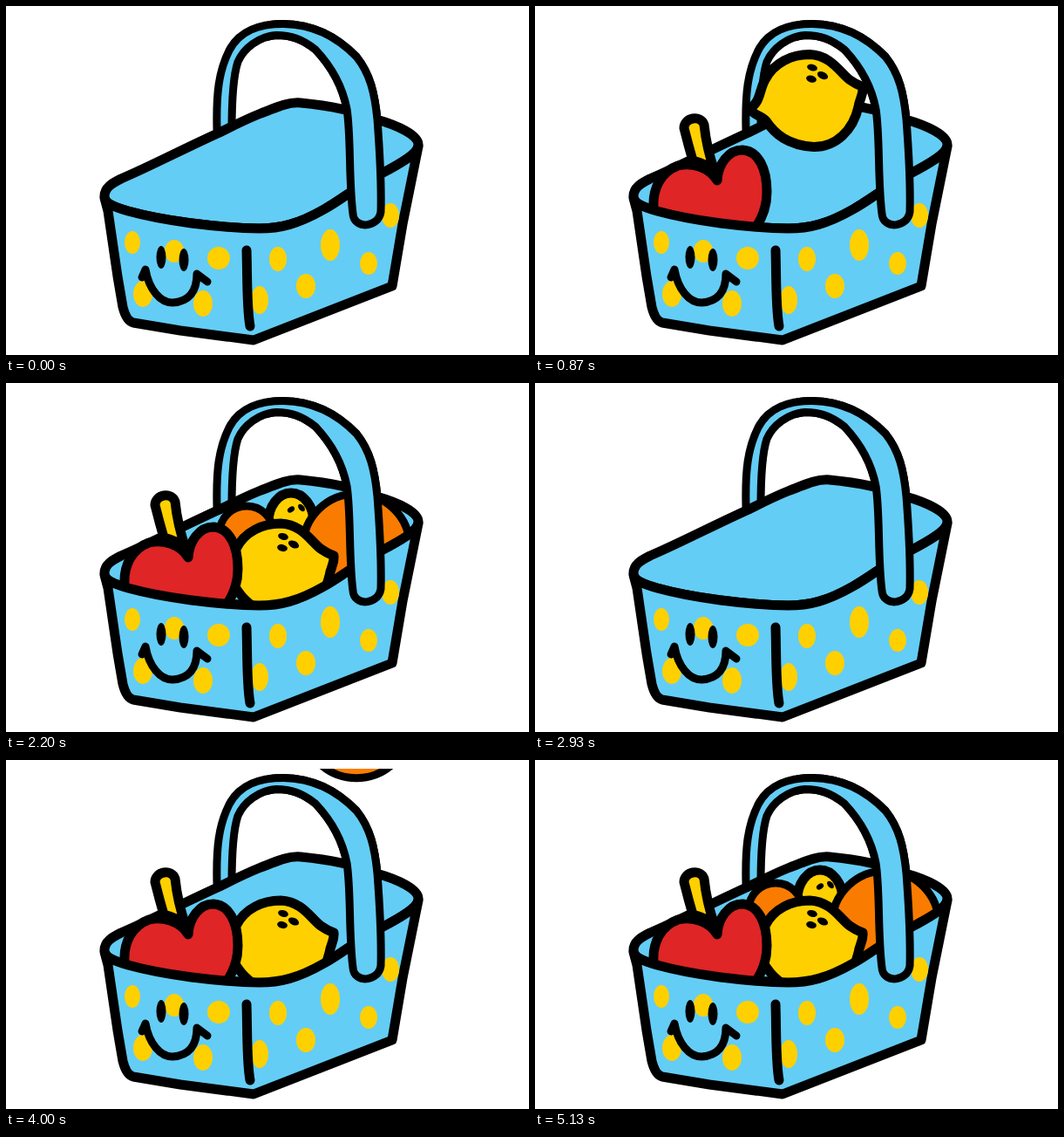
Write an HTML page that moves like this. It is 600 by 400 pixels and loops after 5.83 s.

```html
<!DOCTYPE html>
<html lang="en">
<head>
<meta charset="utf-8">
<title>Fruit basket</title>
<style>
  html, body { margin: 0; width: 100%; height: 100%; overflow: hidden; background: #fff; }
  svg { display: block; width: 600px; height: 400px; }
  .line { stroke: #000; stroke-width: 11; stroke-linejoin: round; stroke-linecap: round; }
  .thin { stroke-width: 9; }
  .blue { fill: #64cdf5; }
  .yellow { fill: #ffd000; }
  .orange { fill: #f97c00; }
  .red { fill: #df2525; }
  .none { fill: none; }
</style>
</head>
<body>
<svg viewBox="0 0 600 400">
  <defs>
    <clipPath id="stage"><rect y="10" width="600" height="390"/></clipPath>
    <clipPath id="near"><rect x="300" width="300" height="400"/></clipPath>
    <path id="handle" class="line thin blue" d="M242 142C241 100 244 75 256 51C268 28 290 20.500 318 20.500C352 21 378 34 402 58
      C418 78 423 100 426 130C429 170 431 200 430 236C427 255 399 256 398 238C393 200 396 150 391 118
      C386 92 372 68 355 50C340 38 327 33.500 310 33.500C290 35 273 48 266 64C260 82 259 110 259 142"/>
  </defs>
  <g clip-path="url(#stage)">
    <use href="#handle"/>
    <path class="line blue" d="M113 218C113 208 122 203 132 198C165 184 205 163 245 145C265 135 275 130 290 124
      C315 114 325 110 338 111C370 114 400 120 425 130C450 137 473 148 473 159
      C473 169 450 182 431 192C405 205 385 222 365 233C335 250 315 255 290 255C240 254 180 246 140 235C122 230 113 225 113 218Z"/>

    <!-- Fruit, drawn at rest, back to front -->
    <g id="smallLemon">
      <ellipse class="line yellow" cx="327" cy="160" rx="26" ry="34"/>
      <ellipse cx="327" cy="145" rx="4.500" ry="3" transform="rotate(-35 327 145)"/>
      <ellipse cx="339" cy="143" rx="5" ry="3" transform="rotate(50 339 143)"/>
    </g>
    <circle id="smallOrange" class="line thin orange" cx="276" cy="172" r="31"/>
    <ellipse id="orange" class="line thin orange" cx="402" cy="187" rx="61" ry="60"/>
    <g id="lemon">
      <path class="line yellow" d="M246 223C259 216 257 202 264 190C274 170 295 161 315 161C340 162 350 182 361 190
        Q368 195 376 198C377 208 372 212 371 221C365 248 345 267 320 267C290 265 275 252 265 237C259 231 250 230 246 223Z"/>
      <ellipse cx="318" cy="176" rx="6" ry="3.800" transform="rotate(15 318 176)"/>
      <ellipse cx="330" cy="185" rx="6.500" ry="4" transform="rotate(25 330 185)"/>
      <ellipse cx="317" cy="189" rx="6" ry="4" transform="rotate(15 317 189)"/>
    </g>
    <g id="apple">
      <path class="line red" d="M209 200C200 185 180 179 164 183C144 190 135 210 136 230C137 265 160 288 192 288
        C235 286 266 250 266 213C266 186 256 166 238 165C222 165 210 181 209 200Z"/>
      <path class="line none" d="M188 182Q203 189 209 199"/>
      <path class="line yellow" d="M171 140C171 128 190 124 194 136C196 155 200 172 206 189Q197 181 181 177Q176 160 171 140Z"/>
    </g>

    <!-- Front of the basket -->
    <path class="line blue" d="M473 161C473 169 450 182 431 192C405 205 385 222 365 233C335 250 315 255 290 255
      C240 254 180 246 140 235C122 230 113 225 113 220L117 235L128 310L134 345Q138 361 146 363L200 372L284 383L443 321L455 250Z"/>
    <g id="dots" class="yellow"></g>
    <path class="line none" d="M276 280C277 310 276 345 280 367"/>
    <ellipse cx="178" cy="288" rx="5.500" ry="13"/>
    <ellipse cx="204" cy="291" rx="5.500" ry="13"/>
    <path class="line thin none" d="M156 311L160 302C164 325 177 340 191 340C210 339 219 327 219 307L231 316"/>
    <use href="#handle" clip-path="url(#near)"/>
  </g>
</svg>
<script>
  const byId = id => document.getElementById(id);

  // Centre and radii of each spot
  const spots = [
    [145, 271, 9, 13], [193, 281, 11, 13], [244, 289, 13, 13], [157, 330, 11, 15],
    [226, 341, 11, 15], [312, 290, 10, 14], [372, 274, 11, 18], [416, 295, 10, 13],
    [441, 240, 10, 14], [344, 321, 11, 14], [291, 337, 10, 16]
  ];
  byId("dots").innerHTML = spots.map(([x, y, rx, ry]) =>
    `<ellipse cx="${x}" cy="${y}" rx="${rx}" ry="${ry}"/>`).join("");

  const LOOP = 5830, STEP = 40, CYCLE_STEPS = 73, FALL = 31;
  // Step at which each fruit comes to rest
  const landings = { apple: 14.1, lemon: 24.4, orange: 34.3, smallOrange: 45, smallLemon: 55 };

  // 25 steps per second, shown at 30 pictures per second
  function draw(ms) {
    const shown = Math.floor((ms % LOOP + 4) * 0.03) / 0.03;
    const step = Math.floor(shown / STEP + 1e-6) % CYCLE_STEPS;
    for (const [id, landing] of Object.entries(landings)) {
      const y = step < 5 ? -400 : Math.min(0, (step - landing) * FALL);
      byId(id).setAttribute("transform", `translate(0 ${y})`);
    }
  }

  const start = performance.now();
  function tick() {
    draw(performance.now() - start);
    requestAnimationFrame(tick);
  }
  tick();
</script>
</body>
</html>
```
